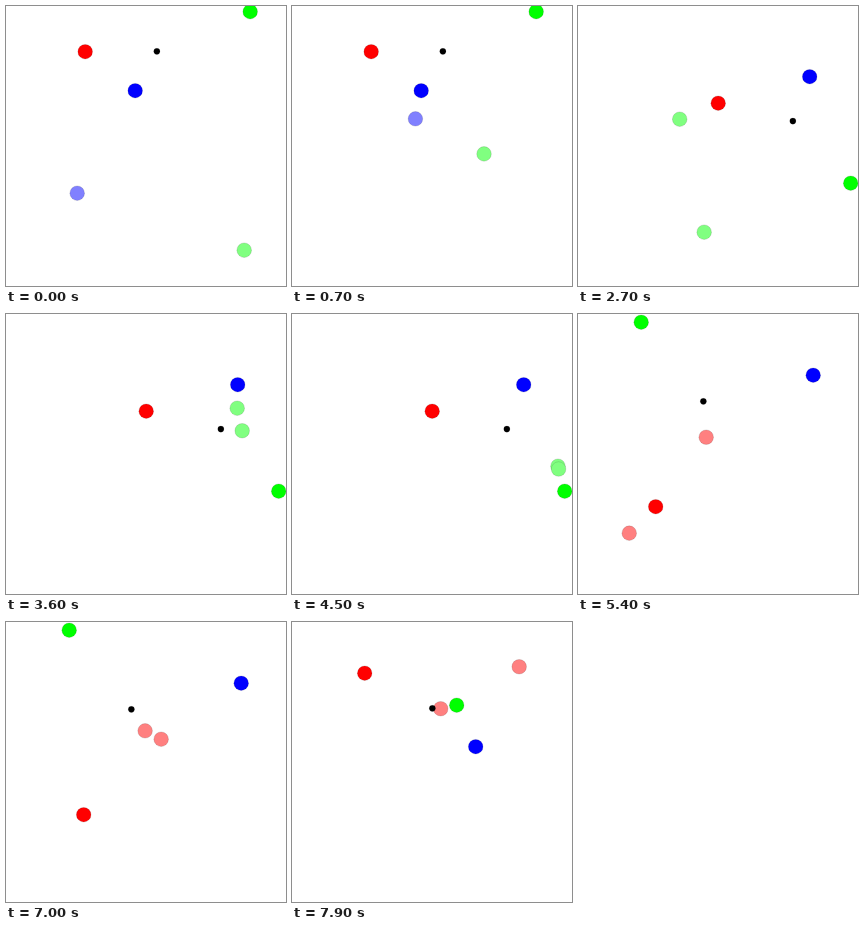
Recreate the animation shown at these times as an HTML page with a canvas. Size 280 px wide and 280 px high, loop 8000 ms.

```html
<!DOCTYPE html>
<html lang="en">
<head>
<meta charset="utf-8">
<title>Three attractors</title>
<style>
  html, body { margin: 0; width: 100%; height: 100%; overflow: hidden; background: #fff; }
  canvas { display: block; width: 100vw; height: 100vh; }
</style>
</head>
<body>
<canvas id="stage" width="280" height="280"></canvas>
<script>
const LOOP = 8000, STEP = 100, SCENE = 25, FALL = 7.5;
const SOLID = ['#f00', '#0f0', '#00f'];
const PALE = ['#ff8080', '#80ff80', '#8080ff'];
const RED = 0, GREEN = 1, BLUE = 2;

// Each mover falls from its start toward the middle, then from step `turn` on to its home.
const scenes = [
  {
    fixed: [[79, 45.5], [244, 5.5], [129, 84.5]], turn: 14,
    movers: [
      { home: BLUE, start: [71, 187], middle: [160.8, 59.1] },
      { home: GREEN, start: [238, 244], middle: [158.6, 78.4] }
    ]
  },
  {
    fixed: [[140, 97], [272.5, 177], [231.5, 70.5]], turn: 11,
    movers: [
      { home: GREEN, start: [90.6, 114.6], middle: [249.5, 91.3] },
      { home: GREEN, start: [116.7, 235.2], middle: [251.7, 100.9] }
    ]
  },
  {
    fixed: [[77.5, 192.5], [63, 8], [235, 61]], turn: 20,
    movers: [
      { home: RED, start: [22.1, 255.3], middle: [139, 108.5] },
      { home: RED, start: [119.1, 125], middle: [155, 117] }
    ]
  },
  {
    fixed: [[72.5, 51], [164.5, 83], [183.5, 124.5]], turn: 20,
    movers: [
      { home: RED, start: [255.6, 30.9], middle: [140, 86] },
      { home: RED, start: [151.3, 86.7], middle: [140, 86] }
    ]
  }
];

const ctx = document.getElementById('stage').getContext('2d');
ctx.translate(0.2, 0.2);

const mix = (a, b, u) => a.map((v, k) => v + (b[k] - v) * u);

function smooth(u) {
  u = Math.min(Math.max(u, 0), 1);
  return u * u * (3 - 2 * u);
}

function position(mover, scene, t) {
  const fallen = 1 - Math.exp(-((t / FALL) ** 2));
  const homing = smooth((t - scene.turn) / (SCENE - scene.turn));
  return mix(mix(mover.start, mover.middle, fallen), scene.fixed[mover.home], homing);
}

function centroid(points) {
  return [0, 1].map(k => points.reduce((sum, p) => sum + p[k], 0) / points.length);
}

function dot([x, y], r, color) {
  ctx.beginPath();
  ctx.arc(x, y, r, 0, 2 * Math.PI);
  ctx.fillStyle = color;
  ctx.fill();
  ctx.lineWidth = 0.4;
  ctx.strokeStyle = 'rgba(0,0,0,.3)';
  ctx.stroke();
}

function draw(ms) {
  const step = Math.floor((ms % LOOP) / STEP);
  const scene = scenes[Math.floor(step / SCENE)];
  ctx.fillStyle = '#fff';
  ctx.fillRect(-1, -1, 282, 282);
  scene.movers.forEach(m => dot(position(m, scene, step % SCENE), 7.3, PALE[m.home]));
  scene.fixed.forEach((p, i) => dot(p, 7.3, SOLID[i]));
  dot(centroid(scene.fixed), 3.1, '#000');
}

const begin = performance.now();
function tick() {
  draw(performance.now() - begin);
  requestAnimationFrame(tick);
}
tick();
</script>
</body>
</html>
```
